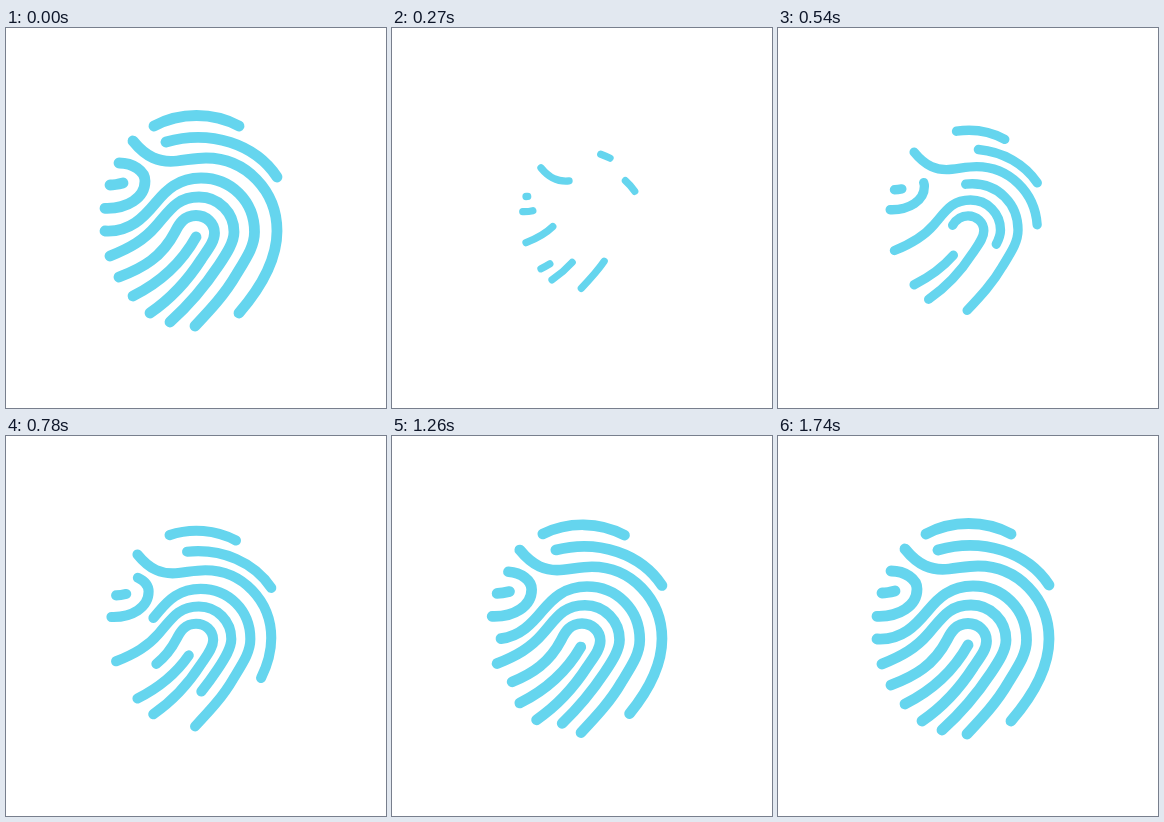
Recreate the animation shown at these times as an HTML page with a canvas. Size 380x380 px, loop 1.83 s.

```html
<!DOCTYPE html>
<html lang="en">
<head>
<meta charset="utf-8">
<title>Fingerprint</title>
<style>
  html, body { margin: 0; width: 100%; height: 100%; overflow: hidden; background: #fff; }
  canvas { display: block; width: 380px; height: 380px; }
</style>
</head>
<body>
<canvas id="stage" width="380" height="380"></canvas>
<script>
const LOOP = 1830, GROW = 1740, STEP = 30, LEAD = 12;
const CENTER = 190, MIN_SCALE = 0.577, WEIGHT = 10, EDGE = 0.8;

// Each ridge starts at the end that stays put while it grows.
const ridges = [
  'M233 98C207 84 174 84 148 98',
  'M271 149C249.5 116.5 205 101 160 114',
  'M127 113C140 129 153 135 171 133C181 132 190 130 200 130C240 130 271 163 271 203C271 235 252 263 233 285',
  'M189 298C205 281 219 266 230 247C241 229 248.5 218 248.5 204C248.5 173 225 150 195 150C172 150 160 162.5 150 174.5C138 189 124 204.5 99 203',
  'M104 228C124 220 138 212 150 198C164 182 171 169 193 169C213 169 228 185 228 204C228 214 221 225 213 237C199 258 183 277 164 294',
  'M144 285C166 270 182 252 195.5 231C203 220 208.5 213 208.5 205C208.5 195 200 187.5 190 187.5C178 187.5 173 196 169 204C156 229 137 240 113 249',
  'M127 268C155 254 175 236 190 209',
  'M99 180.3C121 181 139 170 139 153C139 143 127 135 113 135',
  'M104 157C109 157 113 156 117 155'
].map(d => {
  const el = document.createElementNS('http://www.w3.org/2000/svg', 'path');
  el.setAttribute('d', d);
  return { path: new Path2D(d), length: el.getTotalLength() };
});

const canvas = document.getElementById('stage');
const ctx = canvas.getContext('2d');
const ratio = window.devicePixelRatio || 1;
canvas.width = canvas.height = 380 * ratio;

// cubic-bezier(1/3, 0, 0, 1)
function ease(x) {
  let lo = 0, hi = 1;
  for (let i = 0; i < 30; i++) {
    const q = (lo + hi) / 2;
    if (q * (1 - q) ** 2 + q ** 3 < x) lo = q; else hi = q;
  }
  return lo * lo * (3 - 2 * lo);
}

function draw(time) {
  const t = Math.floor((time % LOOP) / STEP) * STEP;
  const p = t === 0 || t >= GROW ? 1 : ease((t + LEAD) / GROW);
  const scale = MIN_SCALE + (1 - MIN_SCALE) * p;

  ctx.setTransform(ratio, 0, 0, ratio, 0, 0);
  ctx.fillStyle = '#fff';
  ctx.fillRect(0, 0, 380, 380);
  ctx.translate(CENTER, CENTER);
  ctx.scale(scale, scale);
  ctx.translate(-CENTER, -CENTER);
  ctx.strokeStyle = '#65d5ee';
  ctx.lineWidth = WEIGHT + EDGE / scale;
  ctx.lineCap = 'round';
  for (const { path, length } of ridges) {
    ctx.setLineDash(p === 1 ? [] : [length * p, length * 2]);
    ctx.stroke(path);
  }
}

const start = performance.now();
function tick() {
  draw(performance.now() - start);
  requestAnimationFrame(tick);
}
tick();
</script>
</body>
</html>
```
